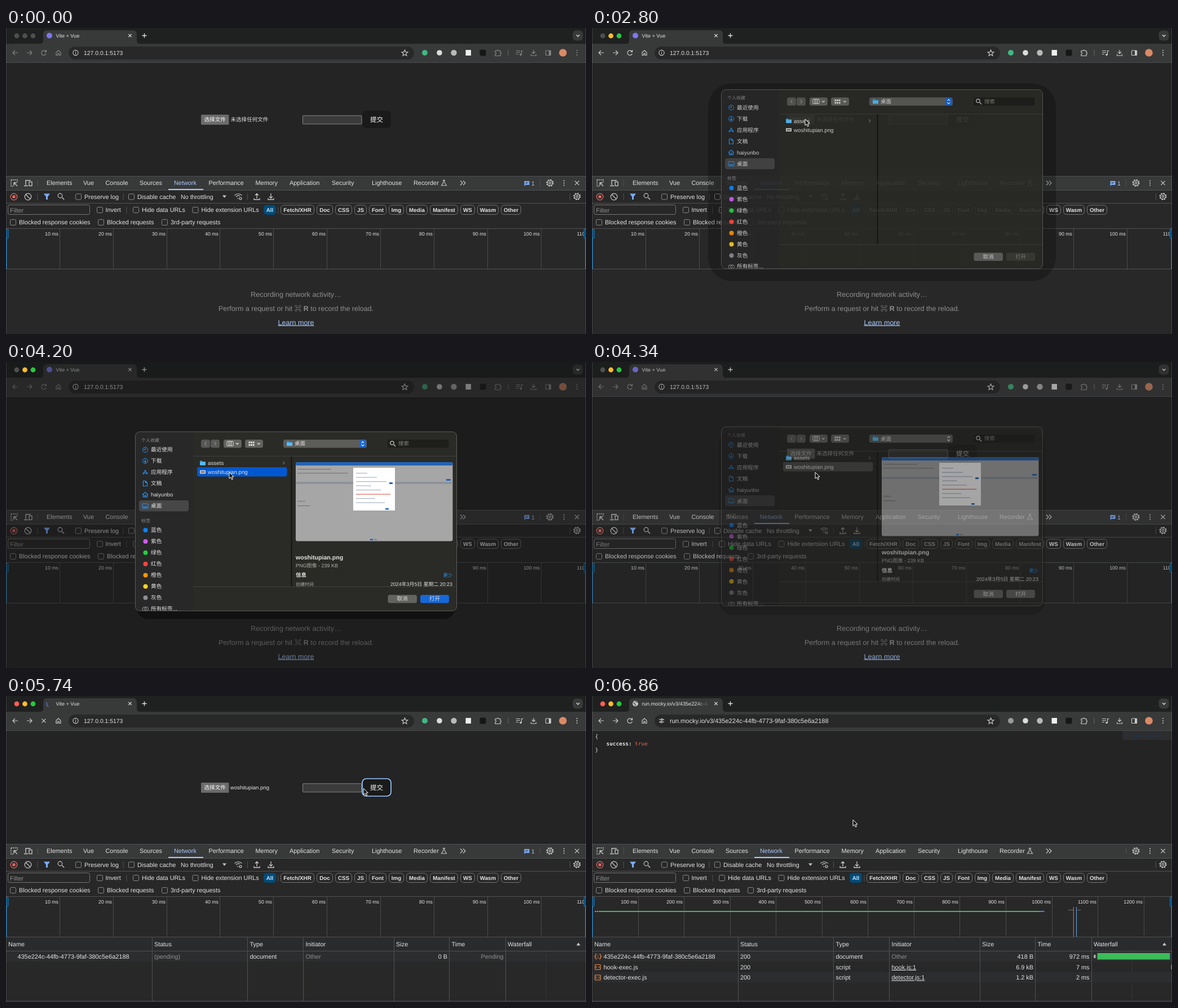
Animation, 1029 px wide and 544 px high, one loop 7560 ms. Source, as an HTML page:

```html
<!DOCTYPE html>
<html lang="zh">
<head>
<meta charset="utf-8">
<title>File upload</title>
<style>
html, body { margin: 0; width: 100%; height: 100%; overflow: hidden; background: #242424; }
svg { display: block; width: 100vw; height: 100vh; }
text { font-family: "Liberation Sans", Arial, "Noto Sans CJK SC", "Noto Sans CJK", "DejaVu Sans", sans-serif; white-space: pre; text-rendering: geometricPrecision; }
.mono { font-family: "DejaVu Sans Mono", monospace; }
</style>
</head>
<body>
<svg id="stage" viewBox="0 0 1029 544" preserveAspectRatio="none"></svg>
<script>
const LOOP = 7560, STEP = 70;
const HASH = '435e224c-44fb-4773-9faf-380c5e6a2188';
const INK = '#e3e3e3', MUTED = '#8f8f8f', LINE = '#505152', BLUE = '#a8c7fa', BAR = '#383939';

const T = (x, cy, s, size = 10.9, fill = INK, extra = '') =>
  `<text x="${x}" y="${(cy + size * 0.36).toFixed(2)}" font-size="${size}" fill="${fill}" ${extra}>${s}</text>`;
const R = (x, y, w, h, fill, r = 0, extra = '') =>
  `<rect x="${x}" y="${y}" width="${w}" height="${h}" rx="${r}" fill="${fill}" ${extra}/>`;
const C = (x, y, r, fill, extra = '') => `<circle cx="${x}" cy="${y}" r="${r}" fill="${fill}" ${extra}/>`;
const P = (d, stroke = 'currentColor', w = 1.2, extra = '') =>
  `<path d="${d}" fill="none" stroke="${stroke}" stroke-width="${w}" ${extra}/>`;
const F = (d, fill) => `<path d="${d}" fill="${fill}"/>`;
const G = (id, body, extra = '') => `<g id="${id}" ${extra}>${body}</g>`;
const H = (y, x = 0, w = 1029, c = LINE) => R(x, y, w, 1, c);
const V = (x, y, h, c = LINE) => R(x, y, 1, h, c);
const END = 'text-anchor="end"', MID = 'text-anchor="middle"', BOLD = 'font-weight="700"';

const cross = (x, y, r, w = 1.3) => P(`M${x - r} ${y - r}l${2 * r} ${2 * r}m0 ${-2 * r}l${-2 * r} ${2 * r}`, 'currentColor', w);
const ring = (x, y, r, w = 1.2, c = 'currentColor') => C(x, y, r, 'none', `stroke="${c}" stroke-width="${w}"`);
const dots = (x, y) => [-4, 0, 4].map(d => C(x, y + d, 1.1, 'currentColor')).join('');
const gear = (x, y) => ring(x, y, 4.6, 1.3) + ring(x, y, 1.8) +
  C(x, y, 5.7, 'none', 'stroke="currentColor" stroke-width="1.8" stroke-dasharray="2.2 2.28"');
const check = (x, cy, label, labelX) =>
  R(x + .5, cy - 5, 10, 10, 'none', 2, 'stroke="#8a8a8a"') + T(labelX, cy, label);
const magnifier = (x, y, r) => ring(x - 1, y - 1, r) + P(`M${x + r * .6} ${y + r * .6}l${r} ${r}`, 'currentColor', 1.4);
const folder = (x, y) => F(`M${x} ${y - 4}h4l1 1.5h5v6.5h-10z`, '#2f9de0') + R(x, y - 1.5, 10, 5.5, '#55bdf5', .8);

function browserChrome() {
  const icons =
    P('M21 44h-9m4-4l-4 4l4 4M37 44h9m-4-4l4 4l-4 4') +
    G('reload', P('M71 42a4.3 4.3 0 1 0 .3 3.5M71.5 39v3.5h-3.5')) + G('stop', cross(67, 44, 3.4)) +
    P('M89 43.5v5h2.8v-3.2h2.4v3.2h2.8v-5l-4-3.6z') +
    P('M868 40.5h3a1.5 1.5 0 0 1 3 0h3v3a1.5 1.5 0 0 1 0 3v3h-9v-3a1.5 1.5 0 0 0 0-3z') +
    P('M905 40.5h7m-7 3h7m-7 3h4m5.5 1v-7h3') + C(913, 47.5, 1.7, 'currentColor') +
    P('M936 39v6.5m-3-3l3 3l3-3M931.5 46.5v2.5h9v-2.5') +
    R(957.5, 40, 9, 8.5, 'none', 1, 'stroke="currentColor" stroke-width="1.2"') + R(963, 40, 4, 8.5, 'currentColor') +
    dots(1013, 44);
  const star = P('M707.5 39l1.5 3.6l3.9 .3l-3 2.5l1 3.8l-3.4-2l-3.4 2l1-3.8l-3-2.5l3.9-.3z');
  const info = ring(123.5, 44, 4.6, 1.1) + R(123, 43.5, 1.1, 3, 'currentColor') + R(123, 41.3, 1.1, 1.2, 'currentColor');
  const tune = P('M119 41.8h3m3.5 0h2.5M119 46.2h2.5m3.5 0h3', 'currentColor', 1.3) + ring(124, 41.8, 1.4) + ring(123, 46.2, 1.4);
  const extensions = C(743, 44, 5, '#41b883', 'id="ext"') + C(769, 44, 4.8, '#dcdcdc') + C(794.5, 44, 5.2, '#b9b9b9') +
    R(815.5, 39, 9.5, 10, '#eeeeee') + R(840.5, 38.5, 11, 11, '#161616', 2) + C(988, 44, 6.8, '#d98a66');
  return R(0, 0, 1029, 28, '#1f2020') + R(0, 28, 1029, 33, BAR) + H(61, 0, 1029, '#4a4b4c') +
    F('M60 28q6 0 6-6v-11q0-7 7-7h152q7 0 7 7v11q0 6 6 6z', BAR) +
    R(1005.5, 4.5, 18, 18, BAR, 6) +
    `<g color="${INK}">${cross(220, 13.5, 2.7, 1.2)}${P('M241.5 13.5h8m-4-4v8M1012 12.3l2.7 2.7l2.7-2.7', 'currentColor', 1.3)}</g>` +
    R(111, 33, 613, 23, '#282828', 11.5) +
    G('home', C(77, 13.5, 5, '#7c78f2')) +
    G('spinner', P('M72 14a5 5 0 0 0 6 4.9', '#5a7bc4', 1.5)) +
    G('globe', C(77, 13.5, 5, '#c7c7c7') + P('M73 12l3 1v2l2 2m-1-8l2 2l3 0', BAR)) +
    G('titleA', T(88.5, 13.5, 'Vite + Vue', 9.1)) +
    G('titleB', T(88.5, 13.5, 'run.mocky.io/v3/435e224c-44', 9.3, 'url(#fade)')) +
    G('urlA', T(138, 44, '127.0.0.1:5173', 10.4) + info, 'color="#d0d0d0"') +
    G('urlB', T(138, 44, 'run.mocky.io/v3/' + HASH, 11.1) + tune, 'color="#d0d0d0"') +
    `<g color="#c9c9c9">${star}</g>` + G('icons', icons) + G('extensions', extensions) + V(890.5, 39, 10, '#6a6a6a');
}

function webPage() {
  return R(0, 62, 1029, 201, '#242424') +
    G('form',
      R(346, 154, 49.5, 18, '#6b6b6b', 1.5, 'id="pick"') + T(351.5, 163, '选择文件', 9.6, '#fff') +
      G('noFile', T(398.5, 163, '未选择任何文件', 9.55)) + G('hasFile', T(398, 163, 'woshitupian.png', 9.55)) +
      R(526.5, 155.8, 104.5, 15, '#3b3b3b', 1, 'stroke="#858585"') +
      R(632, 147, 51, 31, '#1a1a1a', 7, 'id="submit" stroke-width="1.7"') +
      T(657.5, 162.5, '提交', 11.5, '#fff', MID + ' font-weight="500"')) +
    G('json',
      T(5.5, 72, '{', 9.35, INK, 'class="mono"') +
      T(25.5, 84.5, 'success:', 9.35, INK, 'class="mono" ' + BOLD) +
      T(76, 84.5, 'true', 9.35, '#f0654a', 'class="mono"') + T(5.5, 95.5, '}', 9.35, INK, 'class="mono"') +
      R(941, 62, 88, 16, '#2d2d2d') + T(947, 70, '+', 8, '#1d3a66', 'class="mono"') +
      T(959.5, 70, 'view source', 7.9, '#1d3a66', 'class="mono"') + T(1017, 70, '−', 8, '#1d3a66', 'class="mono"'));
}

function ruler(id, gap, unit) {
  let out = '';
  for (let i = 1; i * gap < 1060; i++) {
    const x = Math.round(i * gap);
    out += V(x, 357, 71, '#4a4a4a') + T(x - 2, 366, i * unit + ' ms', 8.8, INK, END);
  }
  return G(id, out);
}

function devtools() {
  const tabs = [[72, 'Elements'], [137, 'Vue'], [176.5, 'Console'], [237, 'Sources'], [298, 'Network'], [359.5, 'Performance'],
    [442.5, 'Memory'], [503, 'Application'], [578, 'Security'], [649, 'Lighthouse'], [723, 'Recorder']];
  const chips = [[487, 547, 'Fetch/XHR'], [551, 580, 'Doc'], [584, 614, 'CSS'], [618, 640, 'JS'], [644, 675, 'Font'], [679, 706, 'Img'],
    [710, 748, 'Media'], [752, 802, 'Manifest'], [806, 832, 'WS'], [836, 874, 'Wasm'], [878, 914, 'Other']];
  const handle = x => R(x, 357.5, 4, 16.5, '#004a77', 1.5, 'stroke="#1b78b8"');
  return `<g color="#c7c7c7">` + R(0, 263, 1029, 26, BAR) + R(0, 289, 1029, 255, '#282828') +
    [263, 288, 311, 356, 428].map(y => H(y)).join('') +
    P('M9 270h11v4M9 270v11h4', 'currentColor', 1.3, 'stroke-dasharray="2 1.3"') + P('M20 281l-6-6m0 5v-5h5', 'currentColor', 1.4) +
    P('M44 271h-9v8m-3 1.5h7', 'currentColor', 1.4) + R(41, 273.5, 5, 7, 'none', 0, 'stroke="currentColor" stroke-width="1.3"') + V(55.5, 269, 12) +
    tabs.map(([x, s]) => T(x, 275.5, s, 10.9, s === 'Network' ? BLUE : INK)).join('') +
    R(288, 286, 62, 2, BLUE) + P('M775 270.5h4m-3 0v4l-3.5 5.5h9l-3.5-5.5v-4', 'currentColor', 1.1) +
    P('M806 271.5l4 4l-4 4m5-8l4 4l-4 4') +
    G('issues', F('M919.5 272h9v7h-7l-2 2z', '#7cacf8') + R(921.5, 274, 5, .9, BAR) + R(921.5, 276, 3.5, .9, BAR) + T(932, 276, '1', 10.5, BLUE)) +
    V(947, 269, 12) + gear(965, 275.5) + dots(990, 275.5) + cross(1013, 275.5, 3.6) +
    ring(14, 300, 5.8, 1.3, '#e46962') + R(11.5, 297.5, 5, 5, '#e46962', .5) +
    ring(39, 300, 5.8) + P('M35 296l8 8') + V(55.5, 294, 12) +
    F('M67 294.5h11l-4 5.5v5h-3v-5z', '#7cacf8') + magnifier(97, 299, 3.8) +
    check(123, 300, 'Preserve log', 139) + V(207.5, 294, 12) + check(217, 300, 'Disable cache', 233) + T(310, 300, 'No throttling', 10.7) +
    F('M384 297.5h7l-3.5 4.5z', '#c7c7c7') +
    P('M405.5 297.5q6.5-5.5 13 0M408 300q4-3.2 7 -1.5M410.5 302.3l1.5 1.5') + ring(416, 303, 2) + V(428, 294, 12) +
    P('M445 303v-8.5m-3 3l3-3l3 3M440 302.5v2.5h10v-2.5M470 294v8.5m-3-3l3 3l3-3M465 302.5v2.5h10v-2.5', 'currentColor', 1.3) +
    V(1000, 294, 12) + gear(1013, 299.5) +
    R(3.5, 314.5, 145, 17, '#282828', 3, 'stroke="#757575"') + T(7, 324, 'Filter', 10.9, MUTED) +
    check(161, 323.5, 'Invert', 176.5) + V(213.5, 318, 12) + check(225, 323.5, 'Hide data URLs', 241) + check(330.5, 323.5, 'Hide extension URLs', 346.5) +
    R(457, 314.5, 22, 17.5, '#004a77', 5) + T(468, 323.5, 'All', 9.9, '#c2e7ff', BOLD + MID) + V(482.5, 318, 12) +
    chips.map(([a, b, s]) => R(a + .5, 315, b - a - 1, 16.5, 'none', 5, 'stroke="#757575"') + T((a + b) / 2, 323.5, s, 9.8, INK, BOLD + MID)).join('') +
    check(7, 345.5, 'Blocked response cookies', 23) + check(163, 345.5, 'Blocked requests', 179) + check(276, 345.5, '3rd-party requests', 292) +
    ruler('rulerA', 94.85, 10) + ruler('rulerB', 81.55, 100) +
    G('barsA', R(0, 382.3, 60, 1, '#6a6a6a') + R(60, 382, 41, 2, '#f29b38') + R(101, 382, 30, 2, '#a66bf0') + R(133, 382, 896, 2, '#3dbb5a')) +
    G('barsB', R(5, 382, 3, 2, '#e46962') + R(9, 382, 2, 2, '#f29b38') + R(12, 382, 782, 2, '#3dbb5a') + R(793.5, 382, 9, 2, '#4a86e8') +
      R(845, 380, 9, 1.2, '#6a6a6a') + R(861, 380, 6, 1.2, '#6a6a6a') + V(853.8, 375, 53, '#e46962') + V(859, 375, 53, '#6aa9f0')) +
    R(0, 374, 1.5, 54, '#1b78b8') + R(1027.5, 374, 1.5, 54, '#1b78b8') + handle(0) + handle(1025.5) +
    G('empty', T(514.5, 473, 'Recording network activity…', 12.7, MUTED, MID) +
      T(514.5, 498, `Perform a request or hit <tspan ${BOLD}>⌘ R</tspan> to record the reload.`, 12.5, MUTED, MID) +
      T(514.5, 523, 'Learn more', 12.5, BLUE, MID + ' text-decoration="underline"')) +
    networkTable() + '</g>';
}

function networkTable() {
  const columns = (y, h) => [259, 428, 527, 688, 786, 886].map(x => V(x, y, h)).join('');
  const row = (cy, name, status, type, init, size, time) =>
    T(20.5, cy, name) + T(263, cy, status, 10.9, status === '200' ? INK : MUTED) + T(432.5, cy, type) +
    T(531.5, cy, init, 10.9, init === 'Other' ? MUTED : INK, init === 'Other' ? '' : 'text-decoration="underline"') +
    T(783, cy, size, 10.9, INK, END) + T(882.5, cy, time, 10.9, time === 'Pending' ? MUTED : INK, END);
  const script = cy => R(5.5, cy - 4.5, 9.5, 9, 'none', 1, 'stroke="#ee8a4a" stroke-width="1.2"') +
    P(`M9 ${cy - 2}l-2 2l2 2m2.5-4l2 2l-2 2`, '#ee8a4a', 1);
  const heads = [[4, 'Name'], [263, 'Status'], [432.5, 'Type'], [531.5, 'Initiator'], [692, 'Size'], [790.5, 'Time'], [890, 'Waterfall']];
  return G('table',
    R(0, 429, 1029, 24, '#292b2d') + R(0, 453, 1029, 19, '#2b2d2f') + H(453) +
    heads.map(([x, s]) => T(x, 441, s)).join('') + F('M1012 443.5h7l-3.5-5z', '#c7c7c7') +
    columns(429, 114) + V(957.5, 454, 88, '#363738') +
    G('pending', row(463, HASH, '(pending)', 'document', 'Other', '0 B', 'Pending')) +
    G('replied', row(463, HASH, '200', 'document', 'Other', '397 B', 'Pending') +
      R(890, 459.5, 10, 6.5, '#f1f1f1') + R(900, 459.5, 12.5, 6.5, '#8a8a8a') + R(914, 457, 115, 11.5, '#3dbb5a')) +
    G('complete', R(0, 491, 1029, 18.5, '#2b2d2f') + columns(491, 18.5) +
      row(463, HASH, '200', 'document', 'Other', '418 B', '972 ms') +
      row(482, 'hook-exec.js', '200', 'script', 'hook.js:1', '6.9 kB', '7 ms') +
      row(500.5, 'detector-exec.js', '200', 'script', 'detector.js:1', '1.2 kB', '2 ms') +
      P('M8.5 458.5q-2 0-2 2t-1.5 2.5q1.5 .5 1.5 2.5t2 2M13 458.5q2 0 2 2t1.5 2.5q-1.5 .5-1.5 2.5t-2 2M10.8 461v1.5m0 2v2', '#ee8a4a') +
      script(482) + script(500.5) +
      R(890.5, 460, 1.5, 6, '#d0d0d0') + R(892, 460, 2, 6, '#8a8a8a') + R(896.5, 457, 127.5, 11.5, '#3dbb5a') +
      R(1024, 457, 1.5, 11.5, '#4a86e8') + R(1027.5, 478, 1.5, 8, '#4a86e8')) +
    H(542));
}

function sidebar() {
  const places = [
    ['最近使用', y => ring(247, y, 4.5, 1) + P(`M247 ${y - 3}v3h-2.5`)],
    ['下载', y => ring(247, y, 4.5, 1) + P(`M247 ${y - 2.5}v5m-2-2l2 2l2-2`)],
    ['应用程序', y => P(`M247 ${y - 4}l-3.5 8m3.5-8l3.5 8M242 ${y + 1.5}h10`)],
    ['文稿', y => P(`M243.5 ${y - 4.5}h4l3 3v6h-7zm4 0v3h3`)],
    ['haiyunbo', y => P(`M242 ${y}l5-4.5l5 4.5m-8.5-1v5h7v-5m-4.5 5v-3h2v3`)],
    ['桌面', y => R(242, y - 4, 10, 8, 'none', 1, 'stroke="currentColor"') + R(243.5, y + 1, 7, 1.5, 'currentColor')]];
  const tags = [['#0a84ff', '蓝色'], ['#cf5df0', '紫色'], ['#1ed13c', '绿色'], ['#ff453a', '红色'], ['#ff9500', '橙色'], ['#ffd21e', '黄色'], ['#8e8e93', '灰色']];
  return F('M332 124h-94.5q-8 0-8 8v302.5q0 8 8 8h94.5z', '#282829') +
    T(240, 139, '个人收藏', 8, '#8b8b8b') + R(236, 246, 88, 19.5, '#474747', 4) +
    `<g color="#2795f5">${places.map(([s, icon], i) => icon(156 + 20 * i) + T(257, 156 + 20 * i, s, 9.7)).join('')}</g>` +
    T(240, 282, '标签', 8, '#8b8b8b') +
    tags.map(([c, s], i) => C(247.5, 299 + 20 * i, 4, c) + T(257, 299 + 20 * i, s, 9.7)).join('') +
    `<g clip-path="url(#panelClip)">${ring(245.5, 439, 3.5, 1, '#999')}${ring(249, 439, 3.5, 1, '#999')}${T(257, 438.5, '所有标签...', 9.7)}</g>`;
}

function preview() {
  let lines = '';
  for (let i = 0; i < 8; i++) lines += R(621, 197 + i * 7.5, 20 + (i * 17) % 44, 1.2, i === 5 ? '#d96a5a' : '#a9b3c4');
  return R(514, 178, 278.5, 140.5, '#a6a6a6', 3) + R(514, 178, 278.5, 6, '#2463b5', 2) + R(514, 213, 278.5, 4, '#8d939b') +
    R(517, 190, 60, 1.2, '#777') + R(517, 197, 90, 1.2, '#777') + R(517, 247, 14, 1.2, '#777') + R(517, 255, 22, 1.2, '#777') +
    R(781, 208, 8, 3, '#2463b5') + R(646, 314.5, 5, 2.5, '#2463b5') + R(653, 314.5, 5, 2.5, '#888') +
    R(616, 188, 74, 76, '#fff') + lines + R(680, 214, 6, 3, '#2463b5') + R(673, 260, 6, 2.5, '#2463b5') +
    T(514, 347.5, 'woshitupian.png', 10.6, INK, BOLD) + T(514, 362, 'PNG图像 - 239 KB', 9, '#b0b0ab') +
    T(514, 379, '信息', 9.6, INK, BOLD) + T(792, 379.5, '更少', 8.3, '#2795f5', END) +
    T(514, 395, '创建时间', 8, '#b0b0ab') + T(792, 395, '2024年3月5日 星期二 20:23', 8.9, INK, END);
}

function openPanel() {
  const btn = (x, w, fill, extra = '') => R(x, 138, w, 14.5, fill, 3.5, extra);
  const grid = [0, 3.7, 7.4].map(d => R(430.5 + d, 141.5, 2.7, 3, 'currentColor') + R(430.5 + d, 146, 2.7, 3, 'currentColor')).join('');
  return G('backdrop', R(229.5, 124, 570, 318.5, '#2a2a26', 8) + sidebar()) +
    btn(346, 16, '#575755') + btn(363, 16, '#575755') + P('M355.5 142l-3 3.3l3 3.3M369.5 142l3 3.3l-3 3.3', '#8c8c8a') +
    btn(386, 32, '#62625f') + btn(424, 32, '#62625f') +
    `<g color="${INK}">${R(392, 141, 11, 8, 'none', 1, 'stroke="currentColor"')}${grid}` +
    P('M395.7 141v8m3.6-8v8M408 144l2.3 2.3l2.3-2.3M446 144l2.3 2.3l2.3-2.3') + '</g>' +
    btn(492, 148, '#5c5c59') + folder(498, 145) + T(512, 145, '桌面', 9.6) +
    R(627, 139, 12, 12.5, '#1668d8', 3, 'id="stepper"') + P('M630.5 143.8l2.3-2.3l2.3 2.3m-4.6 3l2.3 2.3l2.3-2.3', '#fff') +
    btn(677, 108.5, '#1e1e1b') + `<g color="#d0d0d0">${magnifier(686, 145, 3.2)}</g>` + T(696, 145, '搜索', 9.4, '#85857f') +
    H(167, 332, 467.5, '#3f3f3b') + H(399, 332, 467.5, '#3f3f3b') + R(505.8, 168, 1.4, 231, '#0c0c0b') +
    folder(344, 179.5) + T(358, 179.5, 'assets', 9.8) + P('M491.5 177l2.3 2.5l-2.3 2.5', '#a0a0a0', 1) +
    R(339, 187, 159.5, 16.5, '#0058d0', 3, 'id="selected"') +
    R(344, 192.5, 10, 6, '#d8d8d8', .5) + R(345.5, 194, 7, 3, '#77787a') + T(358, 195.5, 'woshitupian.png', 9.8) +
    R(677.5, 414, 51.5, 14.5, '#62625f', 3.5) + T(703, 421, '取消', 9.6, INK, MID) +
    R(735, 414, 51, 14.5, '#3a3a36', 3.5, 'id="openBtn"') + T(760.5, 421, '打开', 9.6, '#85857f', MID + ' id="openText"') +
    G('preview', preview()) +
    R(229.5, 124, 570, 318.5, 'none', 8, 'stroke="#5c5c5a"');
}

const stage = document.getElementById('stage');
stage.innerHTML = `<defs><clipPath id="panelClip"><rect x="230" y="124" width="569" height="318"/></clipPath>
  <linearGradient id="fade" gradientUnits="userSpaceOnUse" x1="185" x2="208"><stop stop-color="${INK}"/><stop offset="1" stop-color="${INK}" stop-opacity="0"/></linearGradient></defs>` +
  browserChrome() + webPage() + devtools() + R(0, 0, 1029, 544, '#121212', 0, 'id="dim"') +
  V(0, 0, 544, '#ffffff24') + V(1028, 0, 544, '#ffffff24') +
  [19, 33.5, 48].map((x, i) => C(x, 14, 4.4, '#4f4f50', `id="light${i}"`)).join('') +
  R(0, 0, 0, 0, '#000', 20, 'id="shadow"') + G('panel', openPanel()) +
  G('cursor', '<path d="M0 0v11.2l2.6-2.4l1.9 4.2l2-.9l-1.9-4.1h3.5z" fill="#111" stroke="#fff" stroke-linejoin="round"/>');

const $ = id => document.getElementById(id);
const show = (id, on) => { $(id).style.display = on ? '' : 'none'; };
const set = (id, name, value) => $(id).setAttribute(name, value);
const clamp = v => Math.max(0, Math.min(1, v));
const phase = (t, a, b) => clamp((t - a) / (b - a));
const mix = (a, b, k) => a + (b - a) * k;

// time, x, y of the pointer tip
const PATH = [[70, 478, 455], [280, 441, 406], [420, 441, 406], [630, 337, 229], [770, 337, 229], [1540, 352, 156], [2100, 352, 156],
  [2240, 378, 162], [3080, 378, 162], [3500, 393, 197], [3570, 393, 197], [3710, 396, 196], [4340, 396, 196], [4620, 432, 195],
  [4760, 509, 195], [4900, 509, 195], [4970, 520, 195], [5320, 648, 159], [5670, 648, 159], [6440, 497, 216], [6650, 497, 216],
  [6860, 463, 220], [LOOP, 463, 220]];

function pointer(t) {
  const i = Math.max(1, PATH.findIndex(p => p[0] >= t));
  const [a, b] = [PATH[i - 1], PATH[i]], k = phase(t, a[0], b[0]);
  return [mix(a[1], b[1], k), mix(a[2], b[2], k)];
}

function renderBrowser(t) {
  const active = t >= 1120, inPanel = t >= 2800 && t < 4480, blurred = t >= 2940 && t < 4480;
  const sent = t >= 5460, replied = t >= 6580, committed = t >= 6720, done = t >= 6860;
  const loading = sent && t < 6790;

  ['#ff5f57', '#febc2e', '#28c840'].forEach((c, i) => set('light' + i, 'fill', active && !(inPanel && i === 0) ? c : '#4f4f50'));
  set('icons', 'color', active && !blurred ? '#c9c9c9' : '#858585');
  set('extensions', 'opacity', blurred ? .8 : 1);
  set('ext', 'fill', committed ? '#9a9a9a' : '#41b883');
  show('reload', !loading); show('stop', loading);
  show('home', !sent); show('spinner', sent && !committed); show('globe', committed);
  set('spinner', 'transform', `rotate(${(t - 6650) * .36} 77 14)`);
  show('titleA', !committed); show('titleB', committed);
  show('urlA', !committed); show('urlB', committed);

  show('form', !committed); show('json', committed);
  show('noFile', t < 4480); show('hasFile', t >= 4480);
  set('pick', 'fill', t >= 2450 && t < 2520 ? '#7d7d7d' : '#6b6b6b');
  set('submit', 'stroke', sent ? '#99c8ff' : t >= 5250 ? '#646cff' : 'none');

  show('issues', !done);
  show('rulerA', !done); show('rulerB', done);
  show('barsA', replied && !done); show('barsB', done);
  show('empty', !sent); show('table', sent);
  show('pending', !replied); show('replied', replied && !done); show('complete', done);
}

function renderPanel(t) {
  const visible = t >= 2800 && t < 4480, chosen = t >= 3920, closing = t >= 4270;
  const open = phase(t, 2800, 3080), close = phase(t, 4240, 4420);
  const lift = -14.5 * (1 - open) ** 2 - 16 * close;
  const spread = 1 - open + .45 * close, grow = mix(-3, 23, spread);
  const top = mix(134, 113, spread), bottom = mix(457, 464.5, spread);

  ['panel', 'shadow', 'dim'].forEach(id => show(id, visible));
  set('panel', 'transform', `translate(0 ${lift})`);
  set('panel', 'opacity', mix(.88, 1, clamp(open * 2)) * (1 - close ** 1.6));
  set('backdrop', 'opacity', 1 - .55 * close);
  set('dim', 'opacity', .42 * open * (1 - close));
  set('shadow', 'x', 229 - grow); set('shadow', 'width', 571 + 2 * grow);
  set('shadow', 'y', top + lift); set('shadow', 'height', bottom - top);
  set('shadow', 'rx', mix(20, 42, spread));
  set('shadow', 'opacity', mix(.42, .25, spread) * (1 - close));

  show('selected', chosen); show('preview', t >= 3990);
  set('selected', 'fill', closing ? '#4a4a48' : '#0058d0');
  set('stepper', 'fill', closing ? '#5c5c59' : '#1668d8');
  set('openBtn', 'fill', closing ? '#62625f' : chosen ? '#1668d8' : '#3a3a36');
  set('openText', 'fill', chosen ? INK : '#85857f');
}

function render(t) {
  renderBrowser(t);
  renderPanel(t);
  show('cursor', t >= 70);
  set('cursor', 'transform', `translate(${pointer(t).join(' ')})`);
}

const start = performance.now();
function frame(now) {
  const t = Math.max(0, now - start) % LOOP;
  render(Math.floor(t / STEP) * STEP);
  requestAnimationFrame(frame);
}
render(0);
requestAnimationFrame(frame);
</script>
</body>
</html>
```
